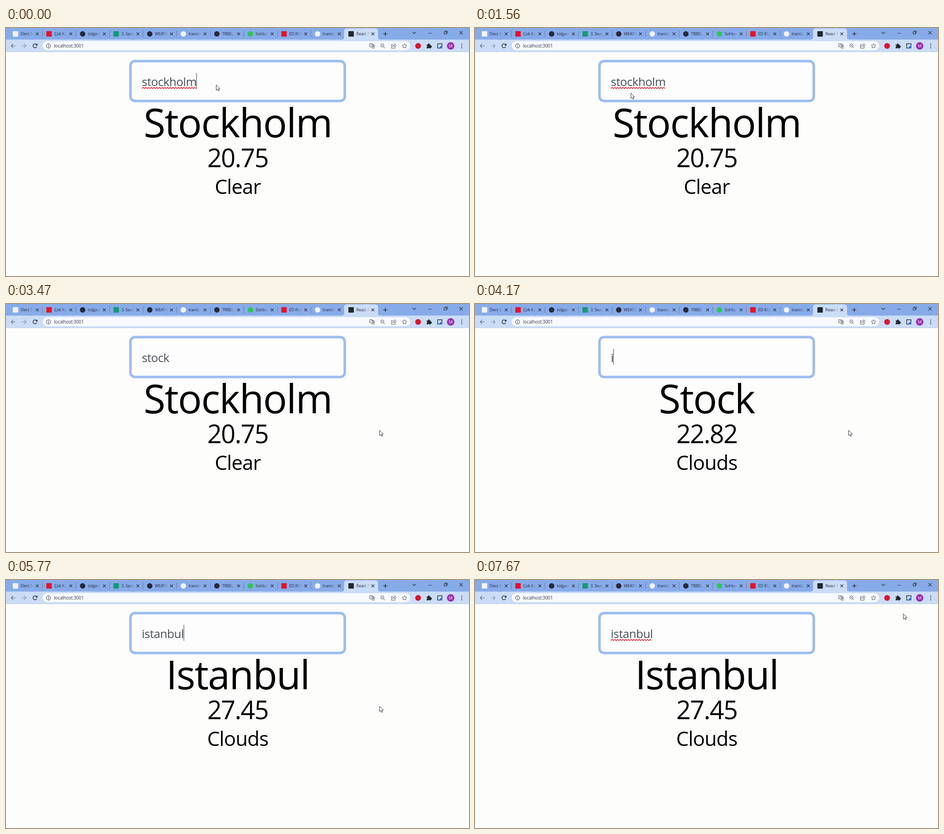
An HTML page that plays this animation: 1023 by 547 pixels, repeating every 7.7 s.

```html
<!DOCTYPE html>
<html lang="en">
<head>
<meta charset="utf-8">
<title>Weather search</title>
<style>
  html, body { margin: 0; width: 100%; height: 100%; overflow: hidden; background: #fdfdfc; }
  svg { display: block; }
  #stage { width: 1023px; height: 547px; }
  text { font-family: "Open Sans", "Noto Sans", sans-serif; letter-spacing: -.02em; white-space: pre; }
  .result { text-anchor: middle; fill: #000; }
  .line { fill: none; stroke: #30343b; stroke-width: 1.2; }
  .tab { font-size: 9px; fill: #20283a; }
</style>
</head>
<body>
<svg id="stage" viewBox="0 0 1023 547">
  <defs>
    <linearGradient id="fadeIdle">
      <stop offset="0" stop-color="#87abe9" stop-opacity="0"/>
      <stop offset="1" stop-color="#87abe9"/>
    </linearGradient>
    <linearGradient id="fadeActive">
      <stop offset="0" stop-color="#cbdcf6" stop-opacity="0"/>
      <stop offset="1" stop-color="#cbdcf6"/>
    </linearGradient>
  </defs>

  <rect width="1023" height="26" fill="#87abe9"/>
  <rect y="25.5" width="1023" height="27.5" fill="#cbdcf6"/>
  <rect y="52" width="1023" height="1" fill="#bccbe2"/>
  <path d="M741 26q6 0 6-6V7q0-6 6-6h63q6 0 6 6v13q0 6 6 6z" fill="#cbdcf6"/>
  <g id="tabs"></g>

  <!-- window controls -->
  <path class="line" stroke-width="1.6" d="M833.5 13h9M838 8.500v9" style="stroke-width:1.5"/>
  <path class="line" d="M898 8.500l4 4 4-4M933 11.500h8M968 8.500h5v5h-5zM970 8.500v-2h5v5h-2M1002 7l7 7M1009 7l-7 7"/>

  <!-- toolbar -->
  <rect x="81" y="29" width="812" height="20" rx="10" fill="#f6f9fe"/>
  <path class="line" d="M21 39.500H12M16 35l-4.500 4.500L16 44" style="stroke:#5d6a7e"/>
  <path class="line" d="M35 39.500h9M40 35l4.500 4.500L40 44" style="stroke:#8492aa"/>
  <path class="line" d="M68 41a4.300 4.300 0 1 1-.6-4.500" style="stroke-width:1.6"/>
  <path d="M69.500 34v4.500H65z" fill="#20242c"/>
  <circle class="line" cx="94" cy="39.500" r="4.700" style="stroke-width:1"/>
  <path class="line" d="M94 38.800v3.200M94 36.500v1.200"/>
  <text x="106" y="43" font-size="10.200" fill="#3b3f46">localhost:3001</text>
  <g class="line" style="stroke:#565c66;stroke-width:1">
    <path d="M803.500 34.500h6l2 7h-8zM808 36.500h5.500v8h-4l-1.500-3M805 38h4M810.500 39.500h2.500M811.700 38.500v3"/>
    <circle cx="831.500" cy="38.500" r="3.500"/>
    <path d="M834 41l3.500 3.500M830 38.500h3"/>
    <path d="M855 36.500h-3.500v8h8.500V42M854 41.500c.5-3 2.500-4.500 5-4.500v-2.500l3.500 3.700-3.500 3.600v-2.500c-2 0-3.500.5-5 2.200z"/>
    <path d="M880.500 34.300l1.500 3.400 3.700.3-2.800 2.500.8 3.600-3.200-1.900-3.200 1.900.8-3.600-2.800-2.500 3.700-.3z"/>
  </g>
  <circle cx="910.500" cy="39.500" r="6.300" fill="#d8142c"/>
  <path d="M929.500 36.500h3a1.800 1.800 0 1 1 3.300 0h2.700v3a1.800 1.800 0 1 1 0 3.200v2.300h-3a1.800 1.800 0 0 0-3.200 0h-2.800v-3a1.700 1.700 0 0 0 0-3.200z" fill="#23272e"/>
  <rect class="line" x="953.700" y="34.700" width="9.600" height="9.600" style="stroke:#20283a;stroke-width:1.400"/>
  <rect x="959" y="40" width="5" height="5" fill="#2670e0"/>
  <circle cx="982.500" cy="39.500" r="8.200" fill="#9a2bab"/>
  <text x="982.500" y="42.700" font-size="9" fill="#fff" text-anchor="middle">M</text>
  <path d="M1007 35.500v.1M1007 39.500v.1M1007 43.500v.1" stroke="#23272e" stroke-width="2.200" stroke-linecap="round"/>

  <!-- page -->
  <rect x="275" y="73" width="473.500" height="88" rx="10" fill="#fdfdfd" stroke="#9cbdef" stroke-width="5.600"/>
  <text id="query" x="300" y="128" font-size="26" fill="#495057"></text>
  <path id="squiggle" fill="none" stroke="#d0142c" stroke-width="1.600"/>
  <rect id="caret" y="99" width="1.200" height="35" fill="#495057"/>
  <text id="city" class="result" x="512" y="240.500" font-size="88"></text>
  <text id="temp" class="result" x="512" y="306.500" font-size="56" style="letter-spacing:-.03em"></text>
  <text id="sky" class="result" x="512" y="366" font-size="44"></text>
  <path id="pointer" d="M.5.500v11.700l2.700-2.500 1.900 4.300 1.900-.8-1.900-4.200h3.700z" fill="#fff" stroke="#1d1f2b" stroke-width=".9"/>
</svg>
<script>
const LOOP = 7700, BLINK = 530, LEFT = 300;
const $ = id => document.getElementById(id);

// Title, icon colour, icon shape
const tabs = [
  ["Ders Se", "#edf2fb", "square"], ["Çok Ke", "#e3142b", "square"],
  ["tolgavn", "#242a36", "circle"], ["3. Seze", "#159a76", "square"],
  ["WEATHE", "#242a36", "circle"], ["translat", "#f1f4fa", "circle"],
  ["TRBEL", "#242a36", "circle"], ["Sohbet", "#2bc653", "circle"],
  ["ED KUR", "#e3142b", "square"], ["translat", "#f1f4fa", "circle"],
  ["React A", "#20262d", "square"]
];

$("tabs").innerHTML = tabs.map(([title, color, shape], i) => {
  const x = i * 74.15, active = i === tabs.length - 1;
  const radius = shape === "circle" ? 6 : 1;
  const divided = i < tabs.length - 2;
  return `<g transform="translate(${x} 0)">
    <rect x="15" y="7" width="12" height="12" rx="${radius}" fill="${color}"/>
    <svg x="32" width="28" height="26">
      <text class="tab" x=".5" y="16">${title}</text>
      <rect x="17" width="11" height="26" fill="url(#fade${active ? "Active" : "Idle"})"/>
    </svg>
    <path class="line" d="M66 10l6 6M72 10l-6 6"/>
    ${divided ? '<path d="M80.500 6v14" stroke="#5f7fb5"/>' : ""}
  </g>`;
}).join("");

// Keystrokes: time and the text that remains in the field
const keys = [[-230, "stockholm"]];
function erase(start, gap, count) {
  for (let i = 0; i < count; i++) keys.push([start + i * gap, keys.at(-1)[1].slice(0, -1)]);
}
function type(start, gap, word) {
  for (let i = 1; i <= word.length; i++) keys.push([start + (i - 1) * gap, word.slice(0, i)]);
}
erase(2440, 130, 4);
keys.push([3600, "stock"]);
erase(3800, 60, 5);
type(4130, 150, "istanbul");
keys.push([5600, "istanbul"]);

const results = [
  [0, "Stockholm", "20.75", "Clear"],
  [3740, "Stock", "22.82", "Clouds"],
  [5690, "Istanbul", "27.45", "Clouds"]
];

// Pointer stops: time, x, y
const stops = [
  [0, 464, 125], [200, 464, 125], [1250, 344, 143], [1600, 344, 143],
  [2020, 826, 274], [2080, 826, 274], [2230, 825, 278], [6700, 825, 278],
  [7160, 1008, 112], [7500, 946, 74], [LOOP, 946, 74]
];

const latest = (list, t) => list.findLast(item => item[0] <= t);
const ease = k => k * k * (3 - 2 * k);

function pointerAt(t) {
  const i = stops.findLastIndex((s, n) => s[0] <= t && n < stops.length - 1);
  const [t0, x0, y0] = stops[i], [t1, x1, y1] = stops[i + 1];
  const k = ease((t - t0) / (t1 - t0));
  return [x0 + (x1 - x0) * k, y0 + (y1 - y0) * k];
}

function wave(width) {
  let d = `M${LEFT} 133.500`;
  for (let x = 3, up = true; x <= width; x += 3, up = !up) d += `L${LEFT + x} ${up ? 131 : 133.5}`;
  return d;
}

function setText(id, value) {
  if ($(id).textContent !== value) $(id).textContent = value;
}

function draw() {
  const t = performance.now() % LOOP;
  const [pressed, query] = latest(keys, t);
  const [, city, temp, sky] = latest(results, t);
  setText("query", query);
  setText("city", city);
  setText("temp", temp);
  setText("sky", sky);

  const width = query ? $("query").getComputedTextLength() : 0;
  const misspelt = t < 2440 || t > 6200;
  $("squiggle").setAttribute("d", misspelt ? wave(width) : "");
  $("caret").setAttribute("x", LEFT + Math.round(width) - .6);
  $("caret").style.opacity = Math.floor((t - pressed) / BLINK) % 2 ? 0 : 1;
  $("pointer").setAttribute("transform", `translate(${pointerAt(t).join(" ")})`);
  requestAnimationFrame(draw);
}
draw();
</script>
</body>
</html>
```
